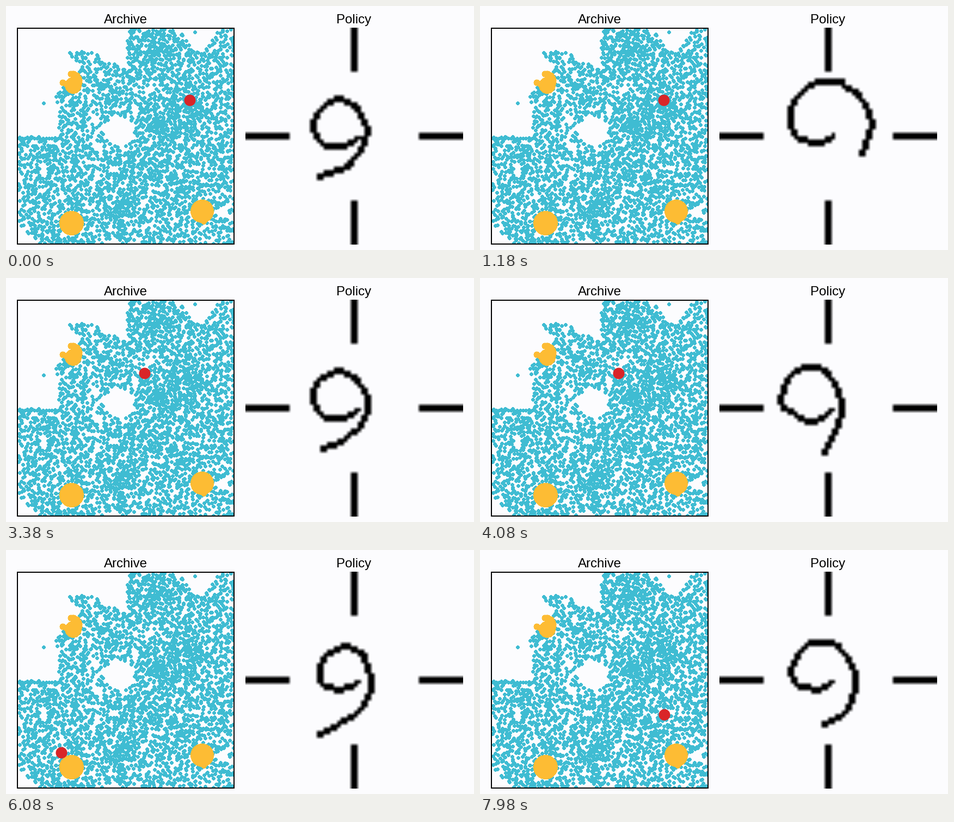
Recreate the animation shown at these times as a matplotlib script. Size 860 by 450 pixels, loop 8000 ms.

```python
import numpy as np
import matplotlib.pyplot as plt
from matplotlib.animation import FuncAnimation
from matplotlib.colors import LinearSegmentedColormap, to_rgb
from matplotlib.patches import Circle, Rectangle
from matplotlib.path import Path

W, H, DPI = 860, 450, 100
STEP, LOOP = 20, 8000
PT = 72 / DPI
BG, TEAL, GOLD, RED = "#fcfcfe", "#3fbcd2", "#fdbc34", "#d92528"

# ---- archive: stage coordinates, panel spans x 20..420, y 40..440 ----
REACH = [(22, 241), (98, 241), (91, 165), (138, 112), (112, 83), (154, 84),
         (222, 118), (222, 42), (316, 42), (345, 84), (364, 84), (390, 42),
         (418, 42), (418, 438), (62, 438), (22, 402)]
DENSE = [(340, 190), (285, 75), (285, 215), (205, 375)]


def stamp(img, x, y, r, color):
    """Paint hard-edged discs of radius r at every (x, y)."""
    n = int(r)
    dy, dx = np.mgrid[-n:n + 1, -n:n + 1]
    keep = np.hypot(dx, dy) <= r
    px = np.add.outer(np.round(np.atleast_1d(x)).astype(int) - 20, dx[keep])
    py = np.add.outer(np.round(np.atleast_1d(y)).astype(int) - 40, dy[keep])
    ok = (px >= 0) & (px < 400) & (py >= 0) & (py < 400)
    img[py[ok], px[ok]] = to_rgb(color)


def archive():
    rng = np.random.default_rng(7)
    img = np.empty((400, 400, 3))
    img[:] = to_rgb(BG)
    x, y = (g.ravel() for g in np.meshgrid(np.arange(22, 420, 4.2),
                                           np.arange(42, 440, 4.2)))
    x = x + rng.uniform(-2.4, 2.4, x.size)
    y = y + rng.uniform(-2.4, 2.4, y.size)
    chance = .44 + sum(.4 * np.exp(-np.hypot(x - a, y - b) ** 2 / 500)
                       for a, b in DENSE)
    hole = np.hypot(x - 206, y - 230) < 27
    keep = Path(REACH).contains_points(np.c_[x, y]) & ~hole
    keep &= rng.random(x.size) < chance
    stamp(img, x[keep], y[keep], 3.5, TEAL)
    stamp(img, np.arange(24, 102, 5.5), np.full(15, 244), 3.5, TEAL)
    stamp(img, [69, 347], [179, 48], 3.2, TEAL)

    stamp(img, 120, 400, 22.5, GOLD)
    stamp(img, 360, 378, 21.5, GOLD)
    stamp(img, 363, 397, 5.5, GOLD)
    # broken disc: solid lower part, hooked rim, short tail
    stamp(img, 123, 146, 15.5, GOLD)
    rim = np.radians(np.linspace(-100, 40, 12))
    stamp(img, 121 + 13 * np.cos(rim), 138 + 13 * np.sin(rim), 6, GOLD)
    stamp(img, [104, 111], [141, 144], 6, GOLD)
    return img


# ---- arm: fixed length, headings (degrees, y down) at five even stations ----
CELL, GRID = 6.25, 64
BASE = complex(645 - 440, 240 - 40) / CELL
REACH_LEN, LINKS = 400 / CELL, 20
REST = np.array([120, 256, 386, 482, 534])
# episode start in ms, goal on the archive, headings on arrival
EPISODES = [
    (-20, (338, 174), (147, 269, 322, 375, 458)),
    (1640, (180, 304), (135, 255, 363, 468, 518)),
    (3200, (255, 176), (120, 200, 280, 383, 376)),
    (4940, (102, 374), (113, 320, 448, 510, 516)),
    (6920, (339, 304), (113, 303, 359, 412, 487)),
]
STARTS = [e[0] for e in EPISODES] + [9000]


def joints(headings):
    s = (np.arange(LINKS) + .5) / LINKS
    angle = np.radians(np.interp(s, np.linspace(0, 1, len(headings)), headings))
    steps = REACH_LEN / LINKS * np.exp(1j * angle)
    return BASE + np.concatenate([[0], np.cumsum(steps)])


CROSS = np.zeros((GRID, GRID))
for bar in (slice(0, 13), slice(51, 64)):
    CROSS[31:33, bar] = CROSS[bar, 31:33] = 1


def draw_arm(z):
    """Two-cell-wide aliased line through the joints."""
    img = CROSS.copy()
    z = np.round(z.real) + 1j * np.round(z.imag)
    for a, d in zip(z, np.diff(z)):
        n = int(max(abs(d.real), abs(d.imag)))
        p = a + d * np.linspace(0, 1, n + 1)
        x, y = np.round(p.real).astype(int), np.round(p.imag).astype(int)
        img[y, x] = 1
        if abs(d.real) > abs(d.imag):
            img[y - 1, x] = 1
        else:
            img[y, x - 1] = 1
    return img


fig = plt.figure(figsize=(W / DPI, H / DPI), dpi=DPI, facecolor=BG)
ax = fig.add_axes([0, 0, 1, 1])
ink = LinearSegmentedColormap.from_list("ink", [BG, "#000000"])
ax.imshow(archive(), extent=(20, 420, 440, 40), interpolation="nearest")
policy = ax.imshow(CROSS, extent=(440, 840, 440, 40), cmap=ink, vmin=0, vmax=1,
                   interpolation="bilinear", interpolation_stage="data")
goal = ax.add_patch(Circle(EPISODES[0][1], 10.5, color=RED, lw=0))
ax.add_patch(Rectangle((21, 41), 398, 398, fill=False, ec="black", lw=2 * PT))
for x, label in ((220, "Archive"), (639, "Policy")):
    ax.text(x, 32, label, ha="center", va="baseline", family="Liberation Sans",
            size=24 * PT, color="black")
ax.set(xlim=(0, W), ylim=(H, 0), aspect="auto")
ax.axis("off")


def update(i):
    t = i * STEP
    k = np.searchsorted(STARTS, t, side="right") - 1
    start, spot, arrival = EPISODES[k]
    u = (t - start) / (STARTS[k + 1] - start)
    ease = 1 - np.cos(np.pi * u / 2)
    policy.set_data(draw_arm(joints(REST + (np.array(arrival) - REST) * ease)))
    goal.center = spot
    return policy, goal


anim = FuncAnimation(fig, update, frames=LOOP // STEP, interval=STEP,
                     repeat=True, repeat_delay=0, blit=False)
plt.show()
```
